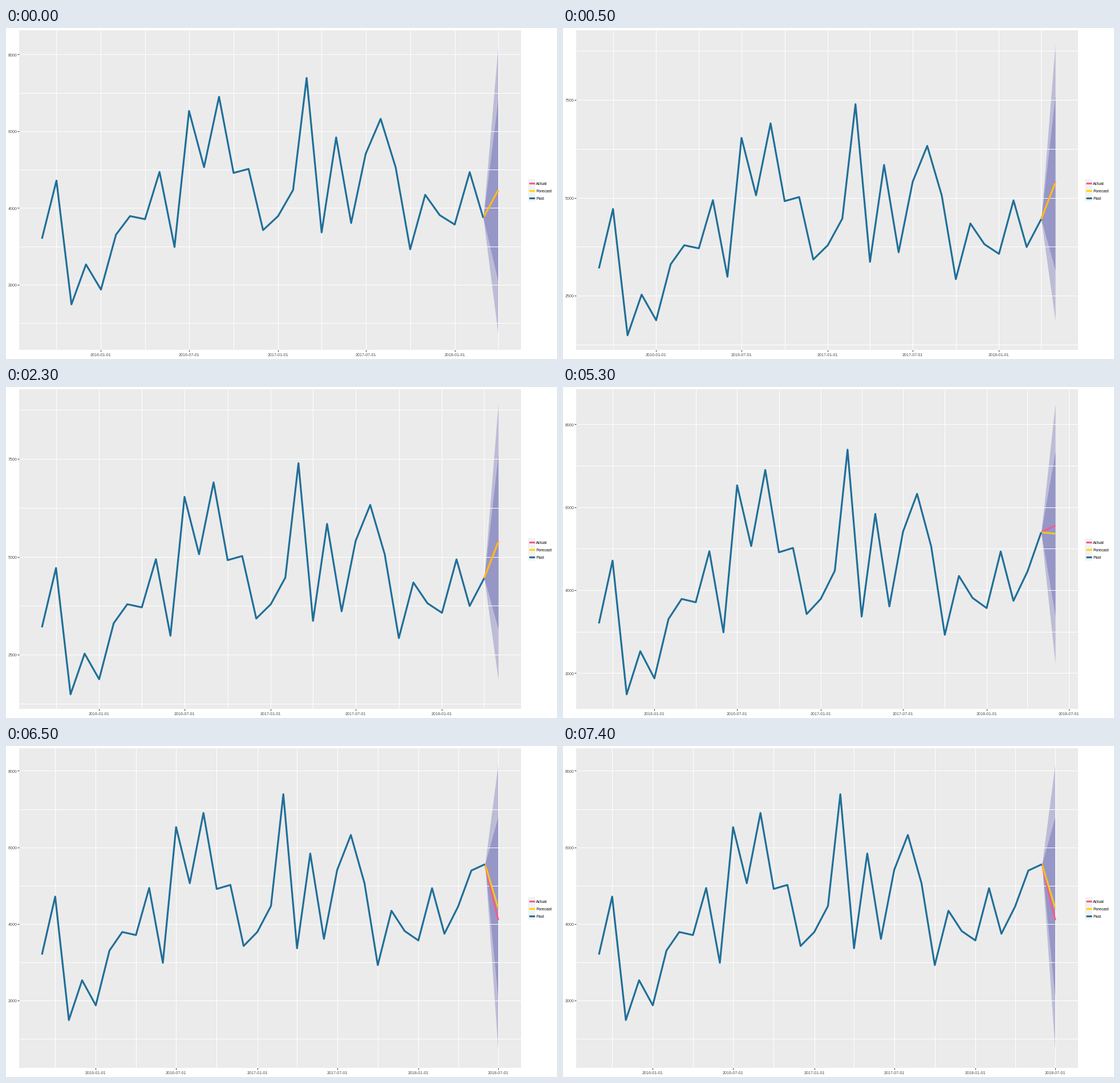
A matplotlib script that plays this animation: 966x580 px, repeating every 8 s.

```python
import matplotlib.pyplot as plt
import numpy as np
from matplotlib.animation import FuncAnimation
from matplotlib.patches import Rectangle

W, H, DPI = 966, 580, 100
LEFT, RIGHT, TOP, BOTTOM = 23, 903, 4, 564
PINK, GOLD, BLUE = "#f75b8c", "#ffd700", "#1f6f99"
FONT = "Liberation Sans"

values = np.array([
    3200, 4715, 1490, 2530, 1875, 3305, 3790, 3710, 4940, 2985, 6530, 5065,
    6900, 4915, 5020, 3425, 3790, 4470, 7390, 3365, 5840, 3610, 5410, 6325,
    5060, 2925, 4345, 3815, 3570, 4935, 3745, 4455, 5395, 5560, 4100])
months = np.arange("2015-09", "2018-08", dtype="datetime64[M]")
days = months.astype("datetime64[D]").astype(int)
days = days - days[0]

# forecast month, forecast value, half width of the outer band, axis step
STEPS = [(31, 4468, 3785, 2000), (32, 5383, 3522, 2500),
         (33, 5365, 3130, 2000), (34, 4415, 3794, 2000)]
INNER = 0.633

fig = plt.figure(figsize=(W / DPI, H / DPI), dpi=DPI, facecolor="white")
ax = fig.add_axes([0, 0, 1, 1])


def pt(px):
    return px * 72 / DPI


def line(x, y, color, width, **kw):
    ax.plot(x, y, color=color, lw=pt(width), solid_capstyle="butt",
            solid_joinstyle="round", **kw)


def box(x, y, w, h, color):
    ax.add_patch(Rectangle((x, y), w, h, fc=color, lw=0))


def label(x, y, text, color, ha):
    ax.text(x, y + 2.6, text, color=color, ha=ha, va="baseline",
            family=FONT, size=pt(7.2))


def draw_legend():
    for k, (name, color) in enumerate(
            [("Actual", PINK), ("Forecast", GOLD), ("Past", BLUE)]):
        y = 271.5 + 13 * k
        box(915, y - 6.5, 13, 13, "#f2f2f2")
        line([916.5, 927], [y, y], color, 3.2)
        label(929, y + 0.5, name, "black", "left")


def draw(i):
    last, forecast, half, step = STEPS[(i + 5) // 6]
    ax.clear()
    ax.set(xlim=(0, W), ylim=(H, 0))
    ax.axis("off")

    lo, hi = min(values.min(), forecast - half), forecast + half
    pad_x, pad_y = (RIGHT - LEFT) / 22, (BOTTOM - TOP) / 22

    def px(d):
        return LEFT + pad_x + d / days[last] * 20 * pad_x

    def py(v):
        return BOTTOM - pad_y - (v - lo) / (hi - lo) * 20 * pad_y

    box(LEFT, TOP, RIGHT - LEFT, BOTTOM - TOP, "#ebebeb")

    for v in range(0, 10001, step // 2):
        y = py(v)
        if TOP < y < BOTTOM:
            line([LEFT, RIGHT], [y, y], "white", 1)
            if v % step == 0:
                line([LEFT - 2.7, LEFT], [y, y], "#333333", 1)
                label(19.8, y + 0.5, str(v), "#4d4d4d", "right")

    for month, day in zip(months, days):
        x = px(day)
        number = month.astype(int) % 12 + 1
        if number in (1, 4, 7, 10) and x < RIGHT:
            line([x, x], [TOP, BOTTOM], "white", 1)
            if number in (1, 7):
                line([x, x], [BOTTOM, BOTTOM + 2.7], "#333333", 1)
                label(x, 572.3, f"{month}-01", "#4d4d4d", "center")

    x, y = px(days), py(values)
    ends = x[last - 1:last + 1]
    start = y[last - 1]
    for h in (half, half * INNER):
        ax.fill_between(ends, [start, py(forecast - h)],
                        [start, py(forecast + h)],
                        color="darkblue", alpha=0.2, lw=0)
    line(ends, y[last - 1:last + 1], PINK, 3.2)
    line(ends, [start, py(forecast)], GOLD, 3.2, alpha=0.8)
    line(x[:last], y[:last], BLUE, 3.2)
    draw_legend()
    return []


anim = FuncAnimation(fig, draw, frames=16, interval=500,
                     init_func=lambda: draw(0), repeat=True)
plt.show()
```
